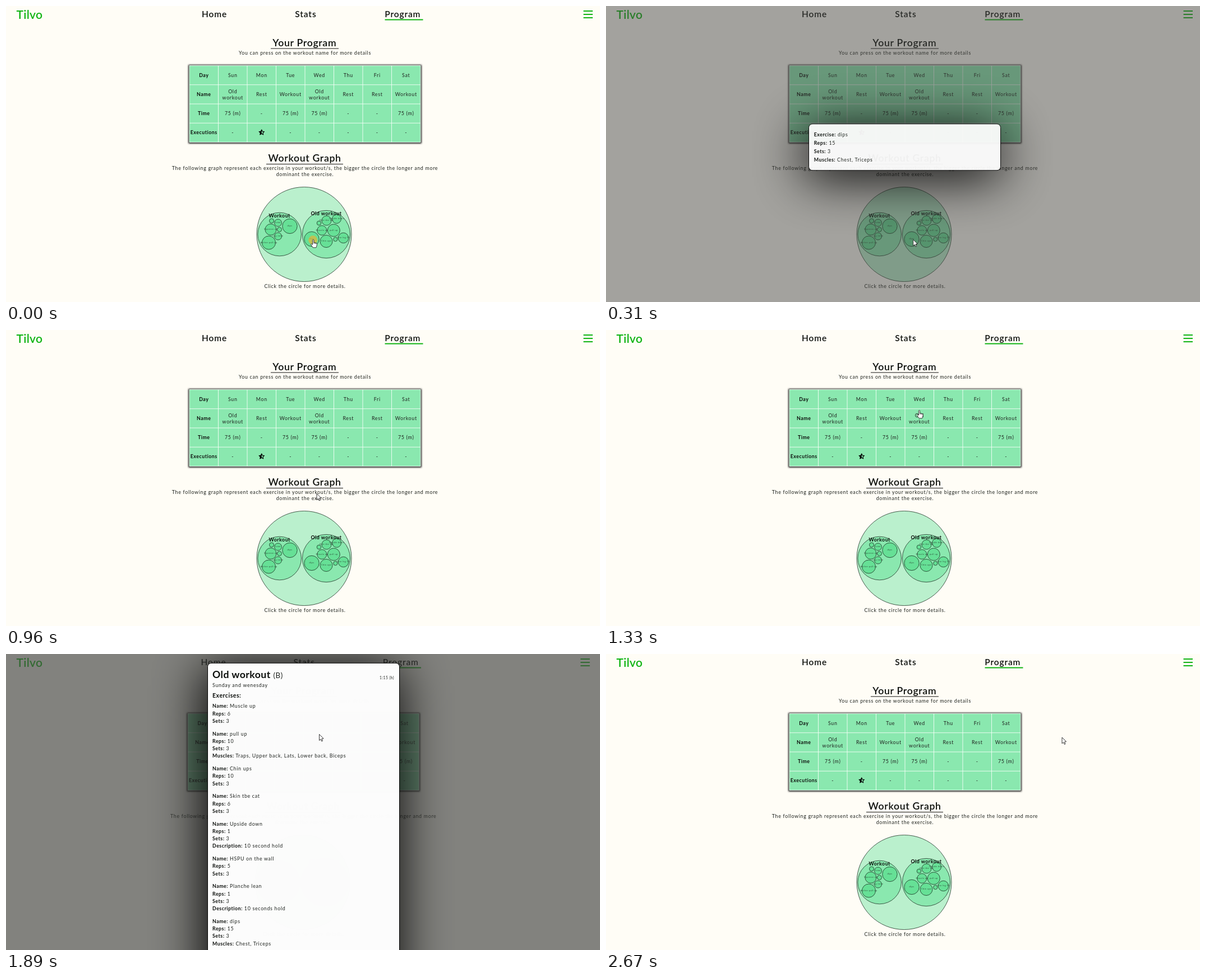
These frames come from a looping animation (1059 by 529 pixels, 3.97 s). An HTML page:

```html
<!DOCTYPE html>
<html lang="en">
<head>
<meta charset="utf-8">
<title>Workout program</title>
<style>
  html, body { margin: 0; width: 100%; height: 100%; overflow: hidden; background: #fffdf6; }
  body { position: relative; }
  svg { position: absolute; left: 0; top: 0; width: 1059px; height: 529px; overflow: visible; }
  text { font: 400 8.83px Lato, "Open Sans", sans-serif; letter-spacing: .7px; fill: #1e221e; white-space: pre; }
  .b { font-weight: 700; letter-spacing: .5px; fill: #0c0f0c; }
  .nav { font-size: 15.45px; font-weight: 600; letter-spacing: .9px; fill: #0c0f0c; }
  .logo { font-size: 21px; font-weight: 600; letter-spacing: .3px; fill: #11b414; }
  .head { font-size: 17.65px; font-weight: 600; letter-spacing: .68px; fill: #0c0f0c; }
  .title { font-size: 17.65px; font-weight: 700; letter-spacing: .45px; fill: #0c0f0c; }
  .sub { font-size: 10.6px; font-weight: 700; letter-spacing: .5px; fill: #0c0f0c; }
  .mark { font-size: 13.2px; letter-spacing: .6px; }
  .time { font-size: 6.6px; letter-spacing: .5px; }
  .tiny { font-size: 3.9px; letter-spacing: .45px; opacity: .75; }
  .green { stroke: #11b414; stroke-width: 2; fill: none; }
  .rule { stroke: #111; stroke-width: 1; }
  #shade { position: absolute; inset: 0; background: rgb(68, 69, 67); }
  .dialog { position: absolute; box-sizing: border-box; width: 343px; background: #fdfdfd;
    border: 1px solid #000; border-radius: 7px; box-shadow: -4px 12px 90px 3px #000; }
</style>
</head>
<body>
<svg id="page" viewBox="0 0 1059 529"></svg>
<div id="shade"></div>
<div class="dialog" id="info"></div>
<div class="dialog" id="plan"></div>
<svg id="pointer" viewBox="0 0 1059 529">
  <circle id="press" r="8" fill="#e2b53a" opacity=".72"/>
  <path id="arrow" d="M0 0V11L2.6 8.8L4.3 12.5L6 11.8L4.4 8.1L7.6 7.6Z" fill="#fff" stroke="#222" stroke-width=".9" stroke-linejoin="round"/>
  <g id="hand" fill="#fff" stroke="#222" stroke-width=".9" stroke-linejoin="round">
    <path d="M-1.1 1.2Q-1.1 0 0 0T1.1 1.2V5L5.4 6.1Q6.8 6.5 6.8 7.9L6.2 11.6L5.2 14.3H-.5L-4 9Q-4.4 7.6-3.1 7.6L-1.1 8.9Z"/>
    <path d="M1.1 5V7.4M3 5.5V7.6M4.9 6V8" fill="none" stroke-width=".7"/>
  </g>
</svg>
<script>
const LOOP = 3970, SLIDE = 27.5, OPEN = 350;
const $ = id => document.getElementById(id);
const clamp = v => Math.max(0, Math.min(1, v));
const smooth = p => p * p * (3 - 2 * p);
const easeOut = p => 1 - (1 - p) ** 3;

const text = (x, y, s, cls = '', anchor = 'start') =>
  `<text x="${x}" y="${y}" class="${cls}" text-anchor="${anchor}">${s}</text>`;
const mid = (x, y, s, cls) => text(x, y, s, cls, 'middle');
const pair = (x, y, key, value) => text(x, y, `<tspan class="b">${key}:</tspan> ${value}`);
const line = (x1, y1, x2, y2, cls) => `<path class="${cls}" d="M${x1} ${y1}L${x2} ${y2}"/>`;
const disc = (x, y, r, fill) =>
  `<circle cx="${x}" cy="${y}" r="${r}" fill="${fill}" stroke="#14281b" stroke-width=".75"/>`;

function star(x, y, r) {
  const pts = [];
  for (let i = 0; i < 10; i++) {
    const a = i * Math.PI / 5, q = i % 2 ? r * .47 : r;
    pts.push([x - q * Math.sin(a), y - q * Math.cos(a)]);
  }
  return `<path d="M${pts.join('L')}Z" fill="none" stroke="#000" stroke-width="1.1" stroke-linejoin="round"/>` +
    `<path d="M${pts.slice(0, 6).join('L')}Z"/>`;
}

function table() {
  const x = 327, y = 106.5, w = 51.5, h = 34.25;
  const days = ['Sun', 'Mon', 'Tue', 'Wed', 'Thu', 'Fri', 'Sat'];
  const names = ['Old workout', 'Rest', 'Workout', 'Old workout', 'Rest', 'Rest', 'Workout'];
  let s = `<filter id="soft" x="-10%" y="-10%" width="120%" height="120%"><feGaussianBlur stdDeviation="1.7"/></filter>
    <rect x="${x - 1.7}" y="${y - 1.2}" width="415.4" height="140.2" filter="url(#soft)"/>
    <rect x="${x}" y="${y}" width="412" height="137" fill="#8ae8af"/>`;
  let grid = `M${x} ${y}h412v137h-412z`;
  for (let c = 1; c < 8; c++) grid += `M${x + c * w} ${y}v137`;
  for (let r = 1; r < 4; r++) grid += `M${x} ${y + r * h}h412`;
  s += `<path d="${grid}" fill="none" stroke="#f4fff8" stroke-width=".9"/>`;
  const base = r => y + r * h + 20.2;
  ['Day', 'Name', 'Time', 'Executions'].forEach((k, r) => s += mid(x + w / 2, base(r), k, 'b'));
  days.forEach((day, i) => {
    const cx = x + (i + 1.5) * w, words = names[i].split(' ');
    s += mid(cx, base(0), day);
    words.forEach((word, k) => s += mid(cx, base(1) + (words.length > 1 ? k * 10.8 - 5.2 : 0), word));
    s += mid(cx, base(2), names[i] === 'Rest' ? '-' : '75 (m)');
    s += i === 1 ? star(cx, 226, 5) : mid(cx, base(3), '-');
  });
  return s;
}

function graph() {
  const bubbles = [
    [473.5, 384, 4], [485, 387.5, 6.5, 'Lean'], [506, 393.5, 13.2, 'dips'], [472, 399.5, 10, 'Squeeze up'],
    [487.5, 399.5, 4], [485, 411.5, 6.5, 'Leg raise'], [468.5, 423, 12, 'Archer pull up'],
    [558, 388, 3.8], [571.5, 383.5, 8.5, 'Skin tbe cat'], [589.5, 380.5, 8, 'Upside down'],
    [563.3, 401, 8.5, 'Muscle up'], [584.3, 401, 11, 'pull up'], [545, 416.5, 13.2, 'dips'],
    [571, 420.5, 11, 'Chin ups'], [587.3, 417, 3.6], [601.5, 414.5, 9.2, 'One leg FL']
  ];
  return disc(531.5, 408, 84.5, '#baf0cd') + disc(487.7, 408, 38.8, '#8ae8af') + disc(571, 408, 42.6, '#8ae8af') +
    bubbles.map(([x, y, r]) => disc(x, y, r, '#66e096')).join('') +
    bubbles.map(([x, y, , s]) => s ? mid(x, y + .8, s, 'tiny') : '').join('') +
    mid(487.7, 377.7, 'Workout', 'b') + mid(571, 374.2, 'Old workout', 'b');
}

function drawPage() {
  const ham = [9, 15, 21].map(y => line(1029.5, y, 1046, y, 'green')).join('');
  // data-s: how far each part moves left while the scrollbar is shown
  $('page').innerHTML =
    text(18.5, 23, 'Tilvo', 'logo') +
    `<g data-s="1.4">${text(349, 20.3, 'Home', 'nav')}</g>
     <g data-s="2.75">${text(515.3, 20.3, 'Stats', 'nav')}</g>
     <g data-s="3.5">${text(675.3, 19.8, 'Program', 'nav')}${line(675.5, 24.5, 743.5, 24.5, 'green')}</g>
     <g data-s="5.2">${ham}</g>
     <g data-s="2.75">` +
    mid(532.3, 71.7, 'Your Program', 'head') + line(472, 76, 593, 76, 'rule') +
    mid(533, 86.6, 'You can press on the workout name for more details') +
    table() +
    mid(532.6, 278.4, 'Workout Graph', 'head') + line(464, 282.6, 601, 282.6, 'rule') +
    mid(533, 293.2, 'The following graph represent each exercise in your workout/s, the bigger the circle the longer and more') +
    mid(533, 304, 'dominant the exercise.') +
    graph() + mid(533, 503.6, 'Click the circle for more details.') + '</g>';
}

function fillDialog(id, x, y, h, body) {
  const el = $(id);
  el.style.cssText = `left:${x}px;top:${y}px;height:${h}px`;
  el.innerHTML = `<svg viewBox="0 0 1059 529" style="left:${-x - 1}px;top:${-y - 1}px">${body}</svg>`;
}

function drawDialogs() {
  const info = [['Exercise', 'dips'], ['Reps', 15], ['Sets', 3], ['Muscles', 'Chest, Triceps']];
  fillDialog('info', 361, 212, 84, info.map(([k, v], i) => pair(370.7, 234.9 + i * 14.95, k, v)).join(''));

  const moves = [
    ['Muscle up', 6], ['pull up', 10, 'Muscles', 'Traps, Upper back, Lats, Lower back, Biceps'],
    ['Chin ups', 10], ['Skin tbe cat', 6], ['Upside down', 1, 'Description', '10 second hold'],
    ['HSPU on the wall', 5], ['Planche lean', 1, 'Description', '10 seconds hold'],
    ['dips', 15, 'Muscles', 'Chest, Triceps'], ['One leg FL raises', 5]
  ];
  const x = 368;
  let y = 96.7;
  let s = text(x, 43.2, 'Old workout', 'title') + text(476.5, 43.2, '(B)', 'mark') +
    text(692, 45, '1:15 (h)', 'time', 'end') +
    text(x, 58.8, 'Sunday and wenesday') + text(x, 78, 'Exercises:', 'sub');
  for (const [name, reps, key, value] of moves) {
    const rows = [['Name', name], ['Reps', reps], ['Sets', 3]];
    if (key) rows.push([key, value]);
    for (const [k, v] of rows) { s += pair(x, y, k, v); y += 13.27; }
    y += 9.4;
  }
  fillDialog('plan', 359, 16, 640, s);
}

const dialogs = [
  { id: 'info', from: 100, to: 780, close: 150 },
  { id: 'plan', from: 1613, to: 2530, close: 135 }
];
// time, x, y of the pointer tip
const path = [
  [0, 547.7, 417.5], [605, 547.7, 417.5], [640, 550.7, 414], [800, 550.7, 414], [1140, 558, 150],
  [1330, 558.5, 143.5], [1990, 558.5, 143.5], [2250, 711, 148.5], [2290, 711, 148.5], [2390, 813, 149], [LOOP, 813, 149]
];
const presses = [[0, 100], [1460, 1600]];
const within = (t, [a, b]) => t >= a && t < b;

function tip(t) {
  const i = path.findIndex(k => k[0] > t);
  const [a, b] = [path[i - 1], path[i]];
  const p = smooth((t - a[0]) / (b[0] - a[0]));
  return [a[1] + (b[1] - a[1]) * p, a[2] + (b[2] - a[2]) * p];
}

function render(t) {
  let shade = 0;
  for (const d of dialogs) {
    const p = clamp((t - d.from) / OPEN), out = 1 - clamp((t - d.to) / d.close);
    const el = $(d.id), shown = easeOut(p) * out;
    el.style.opacity = shown;
    el.style.visibility = shown ? 'visible' : 'hidden';
    el.style.transform = `translateY(${-SLIDE * (1 - easeOut(p))}px)`;
    shade = Math.max(shade, smooth(p) * out);
  }
  $('shade').style.opacity = shade * .75;

  const narrow = within(t, [1613, 2660]);
  for (const g of parts) g.setAttribute('transform', `translate(${narrow ? -g.dataset.s : 0} 0)`);

  const [x, y] = tip(t), hand = t < 150 || within(t, [1190, 1640]);
  for (const id of ['arrow', 'hand']) {
    $(id).setAttribute('transform', `translate(${x} ${y})`);
    $(id).style.display = (id === 'hand') === hand ? '' : 'none';
  }
  $('press').setAttribute('transform', `translate(${x - .5} ${y + .8})`);
  $('press').style.display = presses.some(r => within(t, r)) ? '' : 'none';
}

drawPage();
drawDialogs();
const parts = document.querySelectorAll('[data-s]');
const start = performance.now();
function tick() {
  render((performance.now() - start) % LOOP);
  requestAnimationFrame(tick);
}
render(0);
requestAnimationFrame(tick);
</script>
</body>
</html>
```
